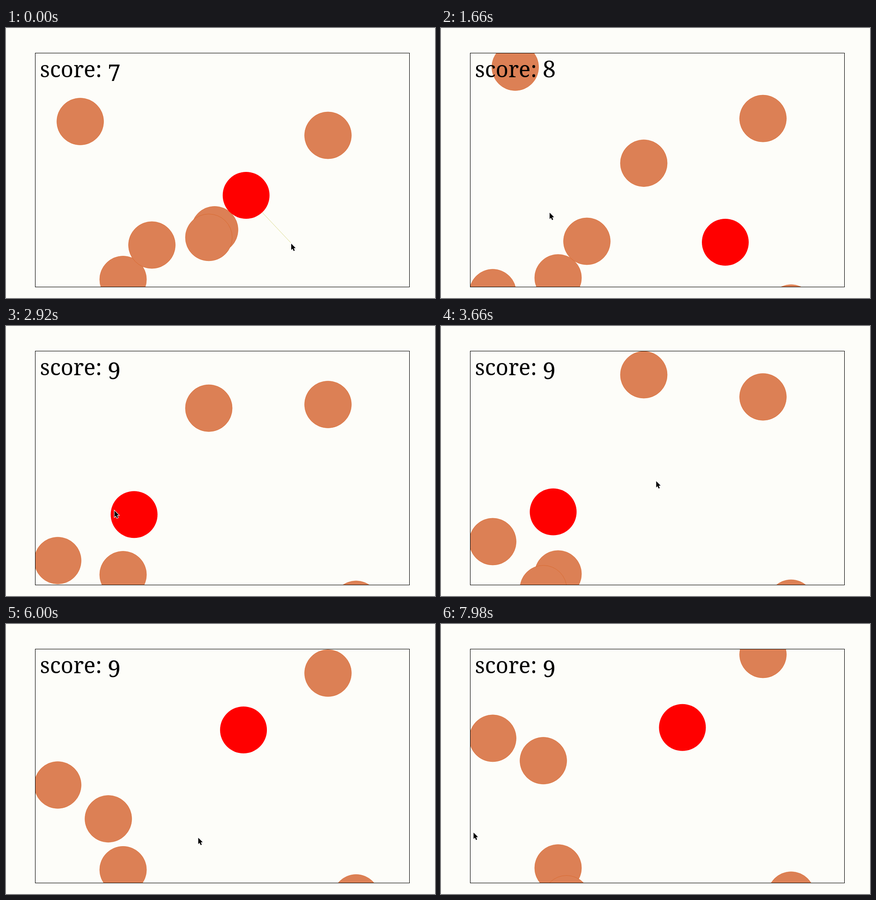
Write an HTML page with a canvas that moves like this. It is 916 by 576 pixels and loops after 8 s.

```html
<!DOCTYPE html>
<html lang="en">
<head>
<meta charset="utf-8">
<title>Bubble game</title>
<style>
html, body { margin: 0; width: 100%; height: 100%; overflow: hidden; background: #fdfdf9; }
canvas { display: block; }
</style>
</head>
<body>
<canvas id="stage" width="916" height="576"></canvas>
<script>
const ctx = document.getElementById('stage').getContext('2d');
const LOOP = 8000, RADIUS = 50, FOLLOW = 0.1017;
const field = { x: 62, y: 53, w: 799, h: 499 };

// Game ticks reached at certain screen updates
const clock = [[1, 0], [36, 37.8], [129, 130.8], [172, 172.7]];

// Bubbles rise at constant speed (px per tick); a popped one disappears at `pop`
const bubbles = [
  { x: 747, y: 602.3, speed: 0.141 },
  { x: 249.5, y: 536, speed: 0.093 },
  { x: 687, y: 228.5, speed: 0.95 },
  { x: 158, y: 199, speed: 3.07 },
  { x: 311, y: 462.5, speed: 0.212, pop: 50.6 },
  { x: 445, y: 430, speed: 3, pop: 1 },
  { x: 432.5, y: 446.3, speed: 4.19 },
  { x: 110, y: 654, speed: 2.378 },
  { x: 218, y: 802.3, speed: 2.96 },
  { x: 267.5, y: 744.2, speed: 0.916 }
];

const clicks = [
  { tick: 0, until: 3, x: 608.6, y: 458.7 },
  { tick: 43.1, until: 46, x: 231.7, y: 394.8 },
  { tick: 96.4, until: 99, x: 515.1, y: 220.2 }
];

// tick, x, y of the pointer tip
const pointerPath = [
  [0, 608.5, 459], [8, 608.5, 459], [20, 420, 428], [31, 231.5, 393], [70, 231, 393],
  [81.8, 459, 330], [95, 516, 220], [108, 518, 220], [130.8, 410, 455],
  [157, 54, 449], [164, 54, 446], [172.7, 69, 444]
];

function interpolate(points, at, column) {
  const last = points.length - 1;
  let i = 1;
  while (i < last && points[i][0] < at) i++;
  const a = points[i - 1], b = points[i];
  const part = Math.max(0, Math.min(1, (at - a[0]) / (b[0] - a[0])));
  return a[column] + (b[column] - a[column]) * part;
}

// Screen updates come in groups of three, held for 20, 20 and 100 ms
function updateIndex(ms) {
  const rest = (ms + 20) % 140;
  return 3 * Math.floor((ms + 20) / 140) + (rest < 20 ? 0 : rest < 40 ? 1 : 2);
}

// The player closes a fixed share of the distance to the clicked point each tick
function playerAt(tick) {
  let x = 512.2, y = 356.5;
  clicks.forEach((click, i) => {
    const next = clicks[i + 1];
    const end = next ? Math.min(tick, next.tick) : tick;
    const left = Math.exp(-FOLLOW * Math.max(0, end - click.tick));
    x = click.x + (x - click.x) * left;
    y = click.y + (y - click.y) * left;
  });
  return { x, y };
}

function disc(x, y, fill) {
  ctx.beginPath();
  ctx.arc(x, y, RADIUS, 0, Math.PI * 2);
  ctx.fillStyle = fill;
  ctx.fill();
}

function drawScore(score) {
  const x = 72, baseline = 104.5;
  ctx.fillStyle = '#000';
  ctx.font = '500 47px "Noto Serif", Georgia, serif';
  ctx.fillText('score: ', x, baseline);
  const width = ctx.measureText('score: ').width;
  ctx.font = '500 50px "Noto Serif", Georgia, serif';
  ctx.fillText(score, x + width, baseline + (score === 8 ? 0 : 8)); // old-style digits
}

function drawPointer(x, y) {
  const outline = [[0, 0], [0, 13.5], [3, 10.8], [5.2, 15.8], [7.6, 14.8], [5.4, 9.8], [9.5, 9.6]];
  ctx.beginPath();
  for (const [dx, dy] of outline) ctx.lineTo(x + dx, y + dy);
  ctx.closePath();
  ctx.strokeStyle = '#fff';
  ctx.lineWidth = 2;
  ctx.stroke();
  ctx.fillStyle = '#000';
  ctx.fill();
}

function draw(ms) {
  const tick = interpolate(clock, updateIndex(ms), 1);
  const player = playerAt(tick);
  ctx.fillStyle = '#fdfdf9';
  ctx.fillRect(0, 0, 916, 576);

  ctx.save();
  ctx.translate(0.5, 0.5); // whole coordinates are pixel centres
  ctx.save();
  ctx.beginPath();
  ctx.rect(field.x, field.y, field.w, field.h);
  ctx.clip();
  for (const b of bubbles) {
    if (tick >= b.pop) continue;
    disc(b.x, b.y - b.speed * tick, '#dc8055');
    ctx.strokeStyle = 'rgba(214, 96, 32, 0.6)';
    ctx.lineWidth = 1;
    ctx.stroke();
  }
  const pressed = clicks.find(c => tick >= c.tick && tick < c.until);
  if (pressed) {
    ctx.beginPath();
    ctx.moveTo(player.x, player.y);
    ctx.lineTo(pressed.x, pressed.y);
    ctx.strokeStyle = '#dcdc90';
    ctx.lineWidth = 1;
    ctx.stroke();
  }
  disc(player.x, player.y, '#f00');
  drawScore(7 + bubbles.filter(b => tick >= b.pop).length);
  ctx.restore();

  ctx.strokeStyle = '#000';
  ctx.lineWidth = 1;
  ctx.strokeRect(field.x, field.y, field.w, field.h);
  drawPointer(interpolate(pointerPath, tick, 1), interpolate(pointerPath, tick, 2) + 0.5);
  ctx.restore();
}

const start = performance.now();
function loop() {
  draw((performance.now() - start) % LOOP);
  requestAnimationFrame(loop);
}
loop();
</script>
</body>
</html>
```
